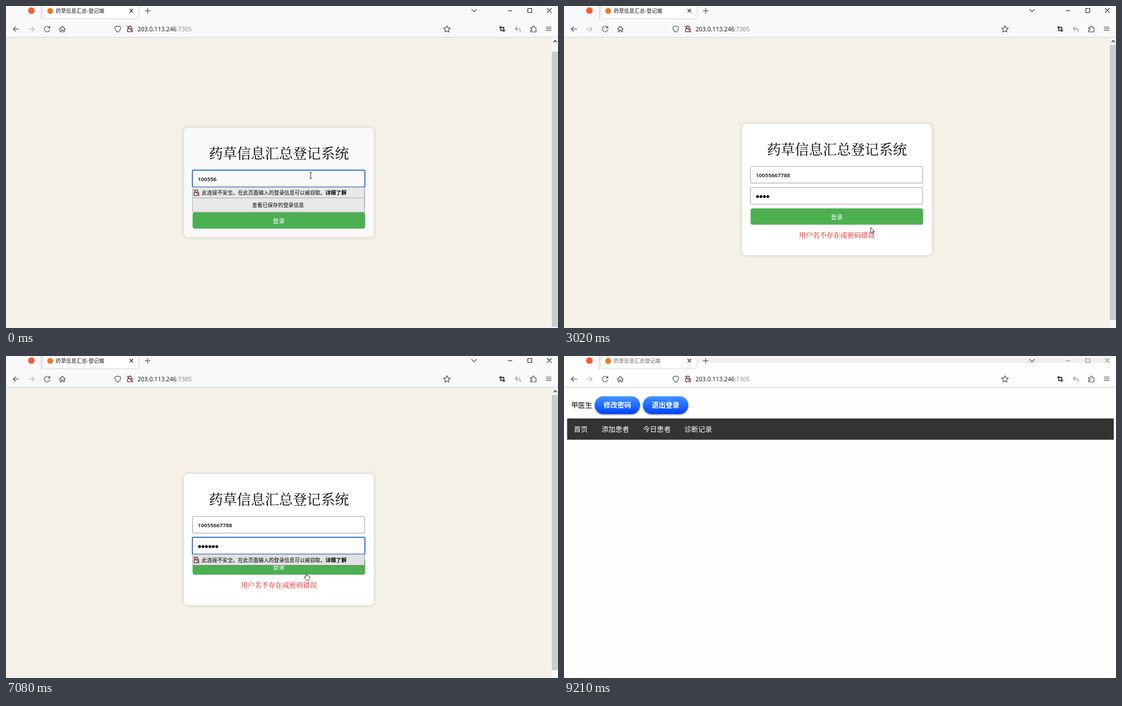
An HTML page for the animation above (9.23 s loop, 978 px wide and 572 px high).

```html
<!DOCTYPE html>
<html lang="zh-CN">
<head>
<meta charset="utf-8">
<title>登录演示</title>
<style>
html, body { margin: 0; width: 100%; height: 100%; overflow: hidden; background: #fefefe; }
svg { display: block; width: 978px; height: 572px; }
text { font-family: 'Noto Sans CJK SC', 'Noto Sans CJK', sans-serif; white-space: pre; }
.num { font-family: 'Open Sans', 'Noto Sans', sans-serif; }
.serif { font-family: 'Noto Serif CJK SC', 'Noto Serif SC', 'Noto Sans CJK SC', serif; }
.icon { fill: none; stroke: #45454d; stroke-width: 1.1; stroke-linecap: round; stroke-linejoin: round; }
</style>
</head>
<body>
<svg viewBox="0 0 978 572" xmlns="http://www.w3.org/2000/svg">
  <defs>
    <filter id="cardShadow" x="-10%" y="-10%" width="120%" height="120%">
      <feDropShadow dx="0" dy="0" stdDeviation="3" flood-color="#000" flood-opacity=".2"/>
    </filter>
    <filter id="tabShadow" x="-5%" y="-30%" width="110%" height="160%">
      <feDropShadow dx="0" dy="0" stdDeviation="1.2" flood-color="#000" flood-opacity=".4"/>
    </filter>
    <filter id="pillShadow" x="-10%" y="-20%" width="120%" height="150%">
      <feDropShadow dx="0" dy="1.5" stdDeviation="1.3" flood-color="#000" flood-opacity=".45"/>
    </filter>
    <linearGradient id="pill" x1="0" y1="0" x2="0" y2="1">
      <stop offset="0" stop-color="#4295ff"/>
      <stop offset="1" stop-color="#0043ff"/>
    </linearGradient>
  </defs>
  <g id="stage"></g>
</svg>
<script>
const LOOP = 9230;
const stage = document.getElementById('stage');
const PHONE = '10055667788';

// Value of the last entry [time, ...value] that has begun.
function at(t, list) {
  let now = list[0];
  for (const item of list) if (item[0] <= t) now = item;
  return now;
}

const DIGITS = [[0, 6], [150, 7], [530, 8], [660, 9], [790, 10], [910, 11]];
const DOTS = [[0, 0], [1550, 1], [1700, 2], [1830, 3], [1960, 4], [5405, 5], [5540, 6]];
const CARET = [[0, 0], [150, 1], [1040, 0], [1420, 1], [1700, 0], [3980, 1], [4480, 0],
  [5000, 1], [5270, 0], [5405, 1], [6560, 0]];
const FOCUS = [[0, 'user'], [1170, 'pass'], [2650, ''], [3716, 'pass']];
const POPUP = [[0, 2], [1170, 0], [1300, 1], [2350, 0], [3848, 1]];
const MOUSE = [
  [0, 'beam', 540, 301], [2090, 'beam', 541, 345], [2220, 'hand', 543, 387],
  [2350, 'hand', 543, 393], [2835, 'arrow', 543.3, 393.5],
  [3320, 'hand', 544, 385], [3452, 'hand', 547, 366], [3584, 'beam', 550, 347],
  [3716, 'beam', 551, 340], [5820, 'beam', 551, 341], [5980, 'beam', 551, 343],
  [6560, 'beam', 549, 346], [6733, 'arrow', 545, 361], [6907, 'hand', 537, 379],
  [7080, 'hand', 531.7, 385.5], [7490, 'arrow', 531.7, 385.5],
  [8260, 'arrow', 600, 420], [8395, 'arrow', 720, 470], [8530, 'arrow', 830, 515],
  [8665, 'arrow', 933, 562], [8800, '', 0, 0]
];

const rect = (x, y, w, h, fill, more = '') =>
  `<rect x="${x}" y="${y}" width="${w}" height="${h}" fill="${fill}" ${more}/>`;
const icon = (d, more = '') => `<path class="icon" d="${d}" ${more}/>`;
// Text is placed by the middle of its glyphs.
const text = (x, mid, size, str, fill = '#000', more = '') =>
  `<text x="${x}" y="${(mid + size * .375).toFixed(2)}" font-size="${size}" fill="${fill}" ${more}>${str}</text>`;
const MIDDLE = 'text-anchor="middle"';
const group = (x, y, body) => `<g transform="translate(${x} ${y})">${body}</g>`;

function lock(x, y) {
  return group(x, y,
    icon('M-4 -.5H4V5H-4ZM-2.6 -.5V-2.4A2.6 2.8 0 0 1 2.6 -2.4V-.5', 'style="stroke:#222"') +
    icon('M-5 -5L5 5', 'style="stroke:#e22850;stroke-width:1.4"'));
}

function star(x, y, r) {
  let d = '';
  for (let i = 0; i < 10; i++) {
    const a = i * Math.PI / 5 - Math.PI / 2, k = i % 2 ? r * .48 : r;
    d += `${i ? 'L' : 'M'}${(x + k * Math.cos(a)).toFixed(2)} ${(y + k * Math.sin(a)).toFixed(2)}`;
  }
  return icon(d + 'Z');
}

function chrome(t) {
  const inside = t >= 7490, idle = t >= 9210;
  const pale = 'style="stroke:#b4b4b8"';
  const win = idle ? 'style="stroke:#888"' : 'style="stroke:#222"';
  const tab = inside ? '药草信息汇总登记端' : '药草信息汇总-登记端';
  return rect(0, 0, 978, 56, inside ? '#fefefe' : '#f9f9fb') +
    (inside ? rect(0, 0, 978, 4, '#f8f8f8') : '') +
    (idle ? rect(237, 4, 730, 8, '#f0f0f0') : '') +
    rect(0, 55, 978, 1, '#d2d2d5') +
    rect(62, 0, 1, 24, '#c4c4c8') +
    rect(66, -8, 169, 30, '#fff', 'rx="2.5" filter="url(#tabShadow)"') +
    '<circle cx="45" cy="8.2" r="5.8" fill="#fb5a32"/>' +
    '<circle cx="78.3" cy="8.7" r="5.2" fill="#ee7a1c"/>' +
    text(88, 8.5, 9.2, tab, idle ? '#666' : '#15141a') +
    icon('M219.3 5.5l5.6 5.6M224.9 5.5l-5.6 5.6', 'style="stroke:#222"') +
    icon('M246.5 8.5h9M251 4v9') +
    icon('M825 6l4.3 4.3L833.6 6') +
    icon('M889.5 8.5h7', win) + icon('M924.5 4.5h7v7h-7z', win) +
    icon('M959 4.5l7.2 7.2M966.2 4.5l-7.2 7.2', win) +
    icon('M13 41h10M17 37l-4 4l4 4') +
    icon('M40 41h10M46 37l4 4l-4 4', pale) +
    icon('M77 38.2A5 5 0 1 0 77.7 42M77.7 35.8v3.2h-3.2') +
    icon('M94.8 41L99.8 36L104.8 41M96 40.2V46H98.4V42.6H101.2V46H103.6V40.2') +
    icon('M198 35.5L203 37.2C203.2 42 201 45 198 46.5C195 45 192.8 42 193 37.2Z') +
    lock(219.5, 40.8) +
    text(233, 40.8, 10.6, '203.0.113.246<tspan fill="#86868c">:7305</tspan>', '#15141a', 'class="num"') +
    star(781.2, 41.3, 6.2) +
    icon('M876.5 35.5V43.5H884.5M873.8 38H881.8V46', 'style="stroke-width:2.1;stroke-linecap:butt;stroke-linejoin:miter"') +
    icon('M905.5 37l-3.4 3.3l3.4 3.3M902.6 40.3H907.5C910.5 40.3 911.5 42.5 911 45.5', 'style="stroke:#a6a6aa;stroke-width:1.6"') +
    icon('M929.5 38.5H932.8V37.3A1.7 1.7 0 0 1 936.2 37.3V38.5H939V46H929.5V43.6H931A1.6 1.6 0 0 0 931 40.6H929.5Z') +
    icon('M957 37.5h9M957 40.5h9M957 43.5h9');
}

function scrollbar(top) {
  return rect(967, 56, 11, 516, '#f9f9f9') + rect(967, top, 11, 489, '#cdcdcd') +
    icon('M970.5 64l2.6-2.8l2.6 2.8', 'style="stroke:#505050;stroke-width:1.7"');
}

function field(y, focused, fill) {
  if (!focused) return rect(330.5, y, 305, 29.5, fill, 'rx="1.5" stroke="#97979f" stroke-width=".9"');
  return rect(328.8, y - 1.9, 308.6, 33.2, '#bcd5f6', 'rx="3"') +
    rect(330.4, y - .2, 305.4, 29.8, fill, 'rx="1.5" stroke="#1264d4" stroke-width="1.5"');
}

function popup(y, rows) {
  const fill = rows === 2 ? '#e8e8e6' : '#e1e1e2';
  const edge = 'stroke="#adadad" stroke-width=".9"';
  let out = rect(331, y + 1, 305, rows === 2 ? 44 : 19.5, '#000', 'opacity=".14"') +
    rect(330.5, y, 304.5, 19, fill, edge) + lock(337.3, y + 9.7) +
    text(347, y + 9.7, 9.13, '此连接不安全。在此页面输入的登录信息可以被窃取。<tspan font-weight="700" font-size="9.3">详细了解</tspan>');
  if (rows === 2) {
    out += rect(330.5, y + 19, 304.5, 25, fill, edge) +
      text(482, y + 31.7, 9.2, '查看已保存的登录信息', '#000', MIDDLE);
  }
  return out;
}

function login(t) {
  const failed = t >= 2650;
  const focus = at(t, FOCUS)[1], caret = at(t, CARET)[1];
  const digits = at(t, DIGITS)[1], dots = at(t, DOTS)[1], rows = at(t, POPUP)[1];
  const paper = t < 1170 ? '#f9f9fb' : '#fff';
  let bullets = '';
  for (let i = 0; i < dots; i++) {
    bullets += `<circle cx="${(342.9 + i * 6.1).toFixed(1)}" cy="345.5" r="2.5"/>`;
  }
  let form = rect(315.5, 216.5, 336, failed ? 233 : 194, failed ? '#fff' : '#f9f9f9', 'rx="7" filter="url(#cardShadow)"') +
    text(483.5, 262, 24.8, '药草信息汇总登记系统', '#000', MIDDLE + ' class="serif" font-weight="400"') +
    field(292, focus === 'user', paper) + field(329.5, focus === 'pass', '#fff') +
    text(339.8, 307.3, 9.7, PHONE.slice(0, digits), '#000', 'class="num" font-weight="600"') +
    bullets + rect(330.6, 366.6, 305.8, 28.9, '#4caf50', 'rx="4"') +
    text(483.3, 382.2, 10.6, '登录', '#fff', MIDDLE);
  if (caret && focus === 'user') form += rect(Math.floor(339.8 + digits * 5.55), 300, 1, 13, '#000');
  if (caret && focus === 'pass') form += rect(Math.floor(340.2 + dots * 6.1), 338, 1, 13, '#000');
  if (failed) form += text(483.5, 414.7, 12.25, '用户名不存在或密码错误', '#f00', MIDDLE + ' class="serif"');
  if (rows) form += popup(rows === 2 ? 322 : 359.5, rows);
  return rect(0, 56, 978, 516, '#f6f1e6') + scrollbar(failed ? 69 : 81) +
    group(0, failed ? -7 : 0, form);
}

const LINKS = ['首页', '添加患者', '今日患者', '诊断记录'];

function plainHome() {
  const xs = [5.8, 33.6, 86, 138.4];
  const button = (x, label) =>
    rect(x, 63, 49, 16.8, '#e9e9ed', 'rx="2.6" stroke="#8f8f9d"') +
    text(x + 24.5, 71.6, 10.2, label, '#000', MIDDLE);
  return button(5.9, '修改密码') + button(58.9, '退出登录') +
    LINKS.map((s, i) => text(xs[i], 89, 12.3, s, '#551a8b') +
      rect(xs[i], 94.5, s.length * 12.3, 1, '#551a8b')).join('') +
    text(5.6, 104, 12.3, '1');
}

function styledHome() {
  const xs = [17.5, 66.4, 140, 213.2];
  const pill = (x, label) =>
    rect(x, 71.5, 80.5, 31.5, 'url(#pill)', 'rx="15.7" filter="url(#pillShadow)"') +
    text(x + 40.2, 87.5, 12.3, label, '#fff', MIDDLE + ' font-weight="700"');
  return text(12.8, 87.5, 12.3, '甲医生') + pill(54.3, '修改密码') + pill(139.8, '退出登录') +
    rect(5.5, 111, 968.5, 37.7, '#333') +
    LINKS.map((s, i) => text(xs[i], 130.8, 12.3, s, '#fff')).join('');
}

function cursor(t) {
  const [, kind, x, y] = at(t, MOUSE);
  const line = 'fill="#fff" stroke="#222" stroke-width=".9" stroke-linejoin="round"';
  const shapes = {
    beam: icon('M-2 -5.2H-.6L0 -4.6L.6 -5.2H2M0 -4.6V4.6M-2 5.2H-.6L0 4.6L.6 5.2H2', 'style="stroke:#333;stroke-width:1"'),
    arrow: `<path d="M0 0V9.8L2.2 7.8L3.7 11.2L5.3 10.5L3.8 7.2L6.7 7Z" ${line}/>`,
    hand: `<path d="M-1 1A1 1 0 0 1 1 1V5C1.2 4 2.7 4 2.9 5.2C3.3 4.3 4.6 4.6 4.7 5.7C5.2 5 6.3 5.4 6.3 6.4V9.3C6.3 11 5.3 11.6 5.2 13H-.3C-.6 11.3 -2 10 -3.3 8.2C-4 7 -2.6 6.3 -1.8 7.2L-1 8Z" ${line}/>`
  };
  return kind ? group(x, y, shapes[kind]) : '';
}

function scene(t) {
  const page = t < 7490 ? login(t) : t < 7640 ? plainHome() : styledHome();
  return rect(0, 0, 978, 572, '#fefefe') + page + chrome(t) + cursor(t);
}

let shown = '';
function tick(now) {
  const next = scene(now % LOOP);
  if (next !== shown) stage.innerHTML = shown = next;
  requestAnimationFrame(tick);
}
tick(0);
</script>
</body>
</html>
```
